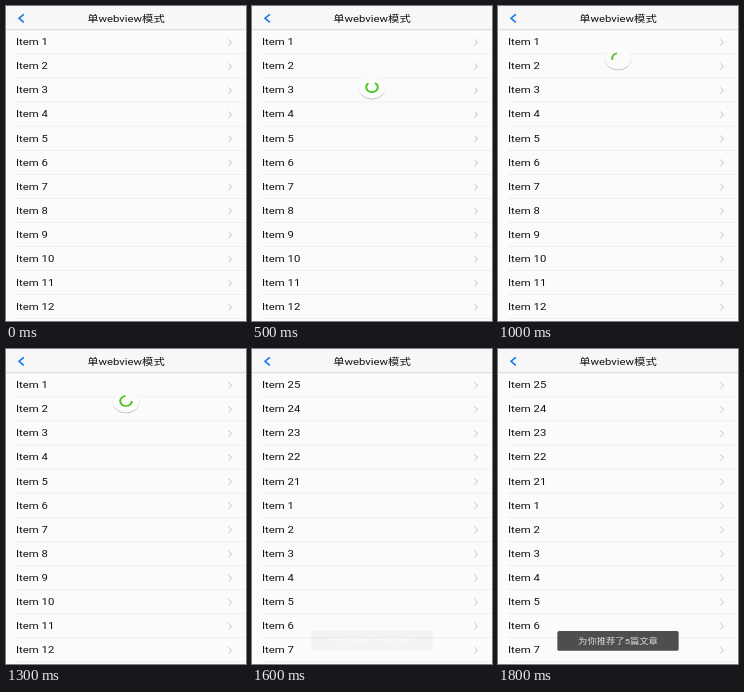
These frames come from a looping animation (240 px wide and 315 px high, 2400 ms). An HTML page:

```html
<!DOCTYPE html>
<html lang="zh-CN">
<head>
<meta charset="utf-8">
<title>Pull to refresh</title>
<style>
  html, body { margin: 0; width: 100%; height: 100%; overflow: hidden; background: #fbfbfb; }
  svg { display: block; width: 100vw; height: 100vh; }
  text { font: 17px Roboto, "Noto Sans CJK SC", "Noto Sans CJK", sans-serif; fill: #111; }
  .mid { text-anchor: middle; }
  .line { fill: none; stroke-linecap: round; stroke-linejoin: round; }
</style>
</head>
<body>
<!-- A 360-wide phone layout, squashed to the stage -->
<svg viewBox="0 0 360 562.5" preserveAspectRatio="none">
  <defs>
    <filter id="shadow" x="-30%" y="-30%" width="160%" height="160%">
      <feDropShadow dx="0" dy="1.2" stdDeviation="1" flood-color="#000" flood-opacity=".42"/>
    </filter>
  </defs>
  <rect width="360" height="562.5" fill="#fbfbfb"/>
  <rect id="press" y="129" width="360" height="43" fill="#ebebeb"/>
  <g id="list"></g>
  <g id="spinner">
    <circle r="20" fill="#fcfcfc" filter="url(#shadow)"/>
    <circle id="arc" r="8.75" pathLength="360" fill="none" stroke="#48c51c" stroke-width="3"/>
  </g>
  <rect width="360" height="42.5" fill="#f7f7f7"/>
  <rect y="41.8" width="360" height="1.4" fill="#cfcfcf"/>
  <path class="line" d="M26 15.5L19.5 22L26 28.5" stroke="#1479f0" stroke-width="2.8"/>
  <text class="mid" x="180" y="28" font-weight="500">单webview模式</text>
  <g id="toast">
    <rect x="89" y="503.5" width="182" height="35.5" rx="3" fill="#4e4e4e"/>
    <text class="mid" x="180" y="527" style="font-size:14px;fill:#dedede">为你推荐了5篇文章</text>
  </g>
</svg>
<script>
const LOOP = 2400, STEP = 100, ROW = 43, TOP = 43;
const $ = id => document.getElementById(id);
const lerp = (a, b, k) => a + (b - a) * k;
const ease = k => k * k * (3 - 2 * k);

const before = Array.from({ length: 12 }, (_, i) => i + 1);
const after = [25, 24, 23, 22, 21, ...before.slice(0, 7)];

$("list").innerHTML = before.map((_, i) => {
  const y = TOP + i * ROW;
  return `<text x="15" y="${y + 27}"></text>
    <path class="line" d="M334 ${y + 17}l4.5 5l-4.5 5" stroke="#bbb" stroke-width="1.5"/>
    <rect x="15" y="${y + ROW - 1}" width="345" height="1" fill="#e6e6e6"/>`;
}).join("");
const labels = $("list").querySelectorAll("text");

// Arc ends in degrees at each half turn of the spinner
const tails = [-150, 160, 360, 670];
const heads = [150, 260, 620, 730];

function spinnerAt(t) {
  if (t < 700) {
    const pull = Math.min(1, (t - 300) / 200);
    return { y: lerp(54, 145, pull), scale: 1, tail: -60, head: lerp(-60, 228, pull), alpha: lerp(0, 1, pull) };
  }
  const half = Math.floor((t - 700) / 300);
  const k = ease((t - 700) / 300 - half);
  return {
    y: 93,
    scale: t < 1500 ? 1 : 0.5,
    tail: lerp(tails[half], tails[half + 1], k),
    head: lerp(heads[half], heads[half + 1], k),
    alpha: 1
  };
}

function draw(t) {
  const items = t < 1500 ? before : after;
  labels.forEach((label, i) => label.textContent = "Item " + items[i]);
  $("press").setAttribute("opacity", t >= 300 && t < 400 ? 1 : 0);

  const spinning = t >= 300 && t < 1600;
  $("spinner").setAttribute("visibility", spinning ? "visible" : "hidden");
  if (spinning) {
    const s = spinnerAt(t);
    $("spinner").setAttribute("transform", `translate(180 ${s.y}) scale(${s.scale})`);
    $("arc").setAttribute("transform", `rotate(${s.tail})`);
    $("arc").setAttribute("stroke-dasharray", `${s.head - s.tail} 360`);
    $("arc").setAttribute("opacity", s.alpha);
  }

  const fade = t < 1600 ? 0 : Math.min(1, lerp(0.04, 1, (t - 1600) / 200));
  $("toast").setAttribute("opacity", fade);
}

let shown = -1;
function tick() {
  const t = Math.floor(performance.now() % LOOP / STEP) * STEP;
  if (t !== shown) draw(shown = t);
  requestAnimationFrame(tick);
}
tick();
</script>
</body>
</html>
```
